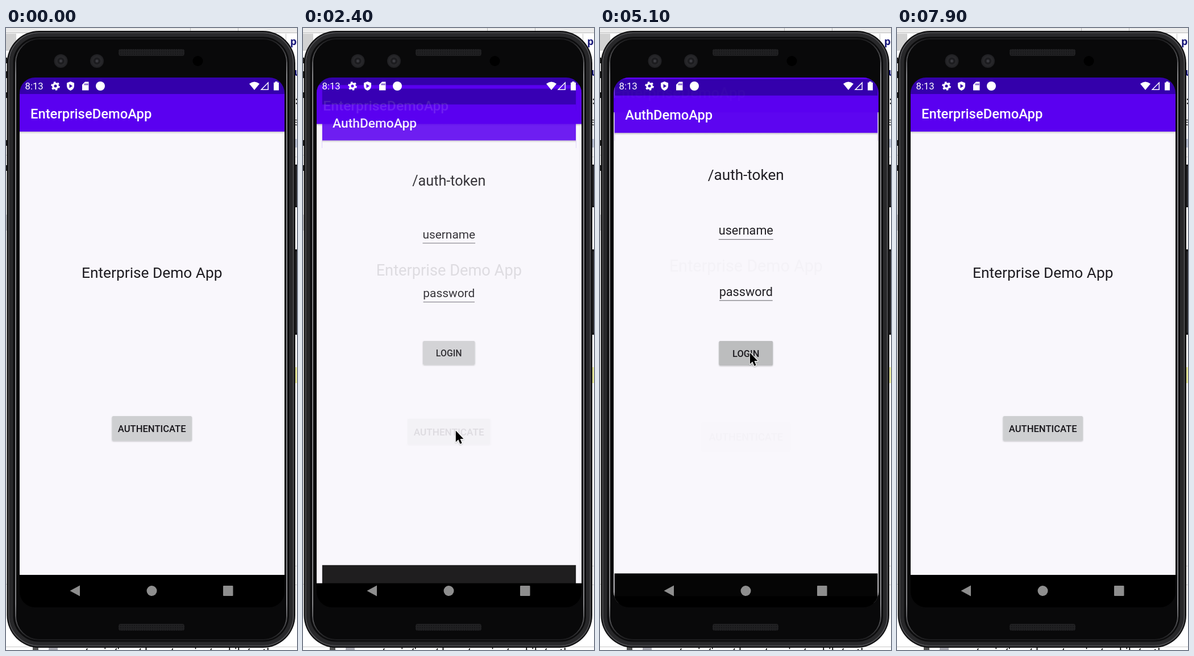
These frames come from a looping animation (512 by 1093 pixels, 8 s). An HTML page:

```html
<!DOCTYPE html>
<html lang="en">
<head>
<meta charset="utf-8">
<title>Phone sign-in demo</title>
<style>
  html, body { margin: 0; width: 100%; height: 100%; overflow: hidden; background: #fff; }
  svg { display: block; width: 512px; height: 1093px; font-family: Roboto, sans-serif; }
  .title { font-size: 23.8px; font-weight: 500; fill: #fff; }
  .head { font-size: 26.3px; fill: #1d1b20; text-anchor: middle; }
  .field { font-size: 21.8px; fill: #1d1b20; text-anchor: middle; }
  .label { font-size: 16.6px; font-weight: 500; fill: #17151a; text-anchor: middle; }
  .code { font-family: "Open Sans", sans-serif; font-weight: 700; font-size: 18px; }
</style>
</head>
<body>
<svg viewBox="0 0 512 1093" xmlns="http://www.w3.org/2000/svg">
  <defs>
    <clipPath id="screen"><rect x="24" y="87" width="466" height="931" rx="27"/></clipPath>
    <clipPath id="homeBtn"><rect x="186.5" y="682" width="140.5" height="43.500" rx="2.5"/></clipPath>
    <clipPath id="authBtn"><rect x="209" y="550" width="95.5" height="43.500" rx="2.5"/></clipPath>
    <linearGradient id="rim" x1="0" y1="0" x2="0" y2="1">
      <stop offset="0" stop-color="#1c1c1e"/>
      <stop offset=".06" stop-color="#858588"/>
      <stop offset=".94" stop-color="#858588"/>
      <stop offset="1" stop-color="#1c1c1e"/>
    </linearGradient>
    <linearGradient id="barShade" x1="0" y1="0" x2="0" y2="1">
      <stop offset="0" stop-color="#000" stop-opacity=".2"/>
      <stop offset="1" stop-color="#000" stop-opacity="0"/>
    </linearGradient>
    <radialGradient id="lens">
      <stop offset="0" stop-color="#4a4a50"/>
      <stop offset=".35" stop-color="#17171a"/>
      <stop offset=".6" stop-color="#29292c"/>
      <stop offset="1" stop-color="#1f1f22"/>
    </radialGradient>
    <pattern id="mesh" width="4" height="4" patternUnits="userSpaceOnUse">
      <rect width="4" height="4" fill="#202022"/>
      <circle cx="2" cy="2" r="1" fill="#141416"/>
    </pattern>
    <filter id="soft" x="-20%" y="-20%" width="140%" height="150%">
      <feDropShadow dx="0" dy="1" stdDeviation="1" flood-color="#000" flood-opacity=".25"/>
    </filter>
  </defs>

  <!-- desktop behind the phone -->
  <rect width="512" height="1093" fill="#fff"/>
  <rect width="512" height="8" fill="#ececec"/>
  <path d="M0 8.5H512M324.500 0V8M408.500 0V8" stroke="#b9b9b9" fill="none"/>
  <rect y="10" width="18" height="30" fill="#d2d2d2"/>
  <rect y="328" width="4" height="28" fill="#d6d6da"/>
  <path d="M0 52h2v10h-2zM0 76h2v12h-2zM0 113h2v10h-2zM0 197h3v10h-3zM0 241h4v10h-4z" fill="#1b1b1b"/>
  <path d="M0 223.500H5M0 977.500H5M506 226.500H512M506 945.500H512M506 978.500H512" stroke="#d0d0d0"/>
  <rect x="492" y="10" width="1" height="40" fill="#c4c4c4"/>
  <text class="code" x="500" y="30" fill="#141478">p</text>
  <text class="code" x="507" y="84" fill="#141478">u</text>
  <text class="code" x="509" y="134" fill="#222">:</text>
  <text class="code" x="505" y="171" fill="#222" style="font-weight:400">e</text>
  <rect x="507" y="195" width="5" height="15" fill="#b9c0d2"/>
  <rect x="508" y="596" width="4" height="28" fill="#e6e69a"/>
  <path d="M0 1087.500H512" stroke="#c9c9c9"/>
  <rect x="47" y="1088" width="10" height="5" fill="#555"/>
  <rect x="75" y="1088" width="16" height="5" fill="#a6a6ae"/>
  <text class="code" x="112" y="1103" fill="#222" style="font-weight:600">src/main/java/demo/service/mobile/auth</text>

  <!-- phone body -->
  <rect x="504" y="240" width="10" height="75" rx="2" fill="#161618"/>
  <rect x="504" y="389" width="10" height="150" rx="2" fill="#161618"/>
  <path d="M510.500 243V312M510.500 393V535" stroke="#38383b"/>
  <rect x="1.500" y="5" width="507.500" height="1084" rx="57" fill="#0c0c0d"/>
  <g fill="none">
    <rect x="5" y="8.500" width="500.500" height="1077" rx="53" stroke="#47474a" stroke-width="2.500"/>
    <rect x="9.500" y="12.500" width="491.500" height="1069" rx="49" stroke="#28282a" stroke-width="6"/>
    <rect x="17" y="19" width="477" height="1056" rx="42" stroke="url(#rim)" stroke-width="2"/>
  </g>
  <rect x="18" y="20" width="475" height="1054" rx="41" fill="#09090a"/>
  <rect x="198" y="37" width="116" height="12" rx="4" fill="url(#mesh)"/>
  <rect x="198" y="1047" width="116" height="12" rx="4" fill="url(#mesh)"/>
  <circle cx="96.500" cy="58" r="12" fill="url(#lens)"/>
  <circle cx="160" cy="58" r="12" fill="url(#lens)"/>
  <circle cx="337.500" cy="58" r="9" fill="#000"/>

  <g clip-path="url(#screen)">
    <g id="home"></g>
    <g id="auth"></g>
    <g id="status" fill="#fff">
      <text x="33.500" y="108.300" font-size="16.700">8:13</text>
      <circle cx="87" cy="102" r="4.200" fill="none" stroke="#fff" stroke-width="3.400"/>
      <circle cx="87" cy="102" r="6.600" fill="none" stroke="#fff" stroke-width="2.400" stroke-dasharray="3.460"/>
      <path fill-rule="evenodd" d="M113.500 94L120 96.500V101.500Q120 107.500 113.500 110Q107 107.500 107 101.500V96.500ZM111.500 98.500V105.500L117 102Z"/>
      <path fill-rule="evenodd" d="M139 94.500H145.500V109.500H134V99.500ZM138.200 97.500V100.500H139.500V97.500ZM140.700 97.500V100.500H142V97.500ZM143 97.500V100.500H144.300V97.500Z"/>
      <circle cx="166" cy="102" r="8"/>
      <path d="M428 98Q437 91 446 98L437 109Z"/>
      <path d="M461.200 96V108.300H449.200Z" fill="none" stroke="#fff" stroke-width="1.500"/>
      <path d="M473.500 94H477.500V95.700H480V109.500H471V95.700H473.500Z"/>
    </g>
    <g fill="#8e8e8e">
      <path d="M112.500 989L130 979.500V998.500Z"/>
      <circle cx="256.500" cy="989" r="9"/>
      <rect x="382" y="980" width="17.500" height="18" rx="1"/>
    </g>
  </g>

  <circle id="ring" r="32.300" fill="none" stroke="#111" stroke-width="2.200"/>
  <path id="cursor" d="M.8 1.500V21.500L5.300 17.300L8.400 24.800L11.600 23.500L8.500 16.100H14.500Z"
        fill="#000" stroke="#fff" stroke-width="2.200" stroke-linejoin="round" paint-order="stroke" filter="url(#soft)"/>
</svg>
<script>
const LOOP = 8000, STEP = 100;
const $ = id => document.getElementById(id);
const clamp = v => Math.max(0, Math.min(1, v));
const mix = (a, b, p) => a + (b - a) * p;
const span = (t, start, length) => clamp((t - start) / length);

const easeOut = p => 1 - (1 - p) ** 3;
const easeBoth = p => p * p * (3 - 2 * p);

// One cubic segment solved for x, given its four points.
function bezier(x, [x0, y0, x1, y1, x2, y2, x3, y3]) {
  const at = (a, b, c, d, u) =>
    a * (1 - u) ** 3 + 3 * b * u * (1 - u) ** 2 + 3 * c * u * u * (1 - u) + d * u ** 3;
  let lo = 0, hi = 1;
  for (let i = 0; i < 24; i++) {
    const mid = (lo + hi) / 2;
    if (at(x0, x1, x2, x3, mid) < x) lo = mid; else hi = mid;
  }
  return at(y0, y1, y2, y3, lo);
}

// Fast start with a long, slow settle.
const slowIn = x => x < 1 / 6
  ? bezier(x, [0, 0, .05, 0, .1333, .06, 1 / 6, .4])
  : bezier(x, [1 / 6, .4, .2083, .82, .25, 1, 1, 1]);

const button = (x, y, w, text, id) => `
  <rect x="${x}" y="${y}" width="${w}" height="43.500" rx="2.500" fill="#cecfd1" filter="url(#soft)"/>
  <g clip-path="url(#${id}Btn)"><circle id="${id}Ripple" fill="#000"/></g>
  <text class="label" x="256.700" y="${y + 28.2}">${text}</text>`;

const field = (text, base, half) => `
  <text class="field" x="256.800" y="${base}">${text}</text>
  <rect x="${256.8 - half}" y="${base + 7.8}" width="${half * 2}" height="1.200" fill="#77757b"/>`;

// Bands overlap downwards so that scaling shows no seams.
const page = (title, body) => `
  <rect x="24" y="87" width="466" height="40" fill="#3400ab"/>
  <rect x="24" y="116" width="466" height="80" fill="#5a00f0"/>
  <rect x="24" y="182" width="466" height="790" fill="#f9f7fc"/>
  <rect x="24" y="182" width="466" height="4" fill="url(#barShade)"/>
  <rect x="24" y="961" width="466" height="57" fill="#000"/>
  <text class="title" x="43" y="158.700">${title}</text>${body}`;

$("home").innerHTML = page("EnterpriseDemoApp",
  `<text class="head" x="256.800" y="438.700">Enterprise Demo App</text>` +
  button(186.5, 682, 140.5, "AUTHENTICATE", "home"));

$("auth").innerHTML = page("AuthDemoApp",
  `<text class="head" x="256.800" y="265">/auth-token</text>` +
  field("username", 362, 48.3) + field("password", 470, 47.2) +
  button(209, 550, 95.5, "LOGIN", "auth"));

const OPEN = 2310, CLOSE = 5062, SLIDE = 400;
const CLICKS = [1800, 4800];

// start, duration, x, y, easing
const MOVES = [
  [600, 700, 271, 705, easeOut],
  [1400, 300, 268, 706, easeBoth],
  [3500, 900, 263, 569, easeOut],
  [5600, 600, 400, 921, easeBoth]
];

function pointer(t) {
  let x = 504, y = 740;
  for (const [start, length, tx, ty, ease] of MOVES) {
    const p = ease(span(t, start, length));
    x = mix(x, tx, p);
    y = mix(y, ty, p);
  }
  return [x, y];
}

function place(id, scale, alpha) {
  const el = $(id);
  el.setAttribute("transform", `translate(256.5 552.5) scale(${scale}) translate(-256.5 -552.5)`);
  el.setAttribute("opacity", alpha);
}

function ripple(id, t, start, x, y) {
  const el = $(id + "Ripple");
  el.setAttribute("cx", x);
  el.setAttribute("cy", y);
  el.setAttribute("r", 95 * span(t, start, 200));
  const fade = 1 - span(t, start + 300, 200);
  el.setAttribute("opacity", fade * mix(.03, .095, span(t, start, 300)));
}

function draw(t) {
  const closing = t >= CLOSE;
  const p = slowIn(span(t, closing ? CLOSE : OPEN, SLIDE));
  if (closing) {
    place("home", mix(1.1, 1, p), 1);
    place("auth", mix(1, .925, p), 1 - span(t, CLOSE + 37, 50));
  } else {
    place("home", mix(1, 1.05, p), 1);
    place("auth", mix(.85, 1, p), span(t, OPEN + 46, 50));
  }

  ripple("home", t, CLICKS[0], 268, 706);
  ripple("auth", t, CLICKS[1], 263, 569);

  const [x, y] = pointer(t);
  $("cursor").setAttribute("transform", `translate(${x} ${y})`);
  $("cursor").setAttribute("opacity", t < 500 ? 0 : 1 - span(t, 6400, 300));

  const click = CLICKS.find(c => t >= c && t < c + 300);
  $("ring").setAttribute("opacity", click === undefined ? 0 : 1 - span(t, click + 100, 200));
  $("ring").setAttribute("cx", x + .3);
  $("ring").setAttribute("cy", y + 3);
}

const begin = performance.now();
function tick() {
  const t = (performance.now() - begin) % LOOP;
  draw(Math.floor(t / STEP) * STEP);
  requestAnimationFrame(tick);
}
tick();
</script>
</body>
</html>
```
